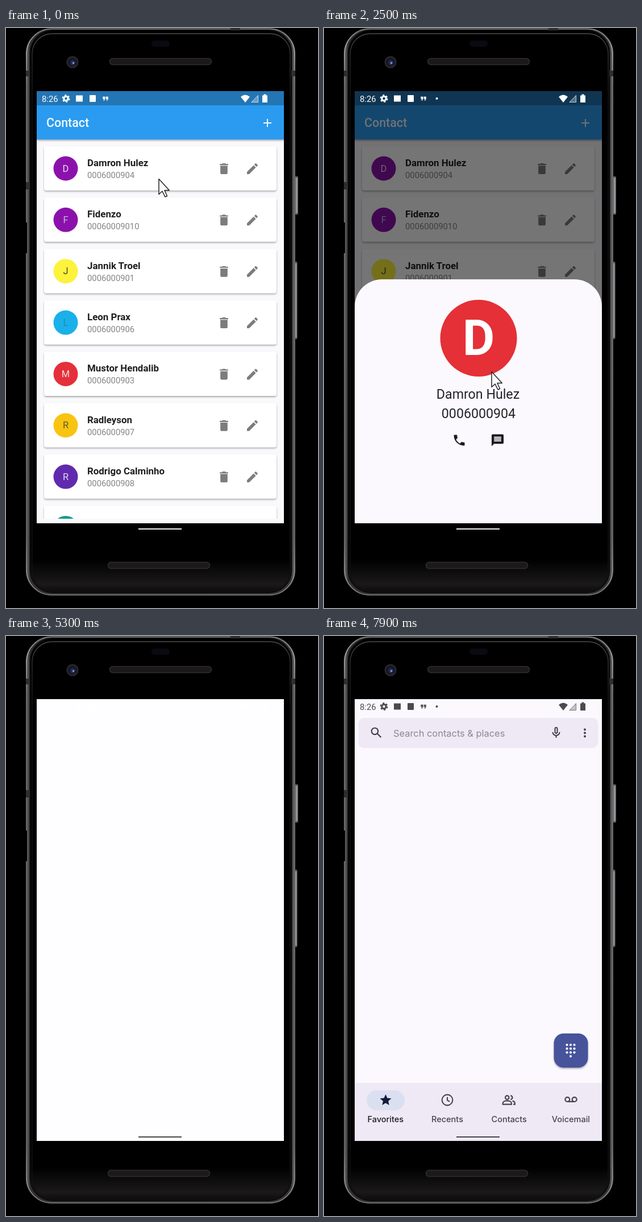
These frames come from a looping animation (549 px wide and 1020 px high, 8000 ms). An HTML page:

```html
<!DOCTYPE html>
<html lang="en">
<head>
<meta charset="utf-8">
<title>Contact app</title>
<style>
html, body { margin: 0; width: 100%; height: 100%; overflow: hidden; background: #000; }
svg { display: block; width: 549px; height: 1020px; }
text { font-family: Roboto, sans-serif; }
.round, .round text { font-family: Inter, sans-serif; }
.mid { text-anchor: middle; }
.line { fill: none; stroke-width: 2; }

.app, .dialer, .scrim, .sheet, .keys, .strip, .menu, .home, .search, .fab,
.status, .note, .dot, .bar, .paper, .cursor {
  animation: 8s linear infinite;
}
.app { animation-name: leave; }
.dialer { animation-name: enter; }
.scrim { animation-name: dim; }
.sheet { animation-name: rise; }
.keys { animation-name: keysMove, keysFade; }
.strip { animation-name: keysFade; }
.menu { animation-name: menu; }
.home { animation-name: home; }
.search { animation-name: search; }
.fab { animation-name: pop; transform-origin: 434px 729px; }
.status { animation-name: ink; }
.note { animation-name: note; transform-origin: 175px 124px; }
.dot { animation-name: dot; }
.bar { animation-name: bar; }
.paper { animation-name: paper; }
.cursor { animation-name: point, show; }

@keyframes leave {
  0%, 49.5% { transform: none; animation-timing-function: cubic-bezier(.3, 0, .8, .15); }
  50.75% { transform: translateX(-182px); animation-timing-function: cubic-bezier(.05, .7, .1, 1); }
  57%, 100% { transform: translateX(-456px); }
}
@keyframes enter {
  0%, 49.5% { transform: translateX(456px); animation-timing-function: cubic-bezier(.3, 0, .8, .15); }
  50.75% { transform: translateX(274px); animation-timing-function: cubic-bezier(.05, .7, .1, 1); }
  57%, 100% { transform: none; }
}
@keyframes dim {
  0%, 23.75% { opacity: 0; }
  26.9%, 100% { opacity: .54; }
}
@keyframes rise {
  0%, 23.75% { transform: translateY(430px); animation-timing-function: cubic-bezier(0, 0, .2, 1); }
  27%, 100% { transform: none; }
}
@keyframes keysMove {
  0%, 75% { transform: translateY(240px); animation-timing-function: cubic-bezier(0, 0, .2, 1); }
  80.6% { transform: none; }
  91.9% { transform: none; animation-timing-function: cubic-bezier(.4, 0, 1, 1); }
  95%, 100% { transform: translateY(440px); }
}
@keyframes keysFade {
  0%, 75% { opacity: 0; }
  78.1%, 100% { opacity: 1; }
}
@keyframes menu {
  0%, 81.2% { opacity: 0; }
  83.5%, 91.8% { opacity: 1; }
  91.9%, 100% { opacity: 0; }
}
@keyframes home {
  0%, 91.8% { opacity: 0; }
  91.9%, 100% { opacity: 1; }
}
@keyframes search {
  0%, 93.75% { opacity: 0; transform: translateY(-8px); }
  97%, 100% { opacity: 1; transform: none; }
}
@keyframes pop {
  0%, 94.4% { transform: scale(0); animation-timing-function: ease-out; }
  97.5%, 100% { transform: none; }
}
@keyframes ink {
  0%, 73.74% { color: #fff; }
  73.75%, 100% { color: #4b4a4f; }
}
@keyframes note {
  0%, 13.5% { transform: none; opacity: 1; }
  15% { transform: scale(.85); opacity: .75; }
  17.5%, 100% { transform: none; opacity: 1; }
}
@keyframes dot {
  0%, 13.5% { transform: translateX(-3px); opacity: 0; }
  15% { transform: translateX(-2px); opacity: 1; }
  17.5%, 100% { transform: none; opacity: 1; }
}
@keyframes bar {
  0%, 56% { fill: #f0f0f3; }
  64%, 100% { fill: #48474c; }
}
@keyframes paper {
  0%, 73.74% { fill: #fefdff; }
  73.75%, 100% { fill: #fcf9fe; }
}
@keyframes point {
  0%, 3% { transform: translate(268px, 265px); animation-timing-function: ease-in-out; }
  11.25% { transform: translate(462px, 164px); }
  12.5% { transform: translate(476px, 174px); }
  15% { transform: translate(443px, 184px); animation-timing-function: ease-in-out; }
  22.5% { transform: translate(300px, 258px); }
  24.5% { transform: translate(292px, 265px); animation-timing-function: ease-in-out; }
  31.25%, 36.25% { transform: translate(294px, 604px); animation-timing-function: ease-in-out; }
  43.75%, 57.5% { transform: translate(234px, 739px); animation-timing-function: ease-in; }
  63.1%, 100% { transform: translate(512px, 521px); }
}
@keyframes show {
  0%, 63.1% { opacity: 1; }
  63.2%, 100% { opacity: 0; }
}
</style>
</head>
<body>
<svg id="stage" viewBox="0 0 549 1020"></svg>
<script>
const PATHS = {
  trash: 'M6 19c0 1.1.9 2 2 2h8c1.1 0 2-.9 2-2V7H6v12zM19 4h-3.5l-1-1h-5l-1 1H5v2h14V4z',
  pencil: 'M3 17.25V21h3.75L17.81 9.94l-3.75-3.75L3 17.25zM20.71 7.04c.39-.39.39-1.02 0-1.41l-2.34-2.34c-.39-.39-1.02-.39-1.41 0l-1.83 1.83 3.75 3.75 1.83-1.83z',
  phone: 'M6.62 10.79c1.44 2.83 3.76 5.14 6.59 6.59l2.2-2.2c.27-.27.67-.36 1.02-.24 1.12.37 2.33.57 3.57.57.55 0 1 .45 1 1V20c0 .55-.45 1-1 1-9.39 0-17-7.61-17-17 0-.55.45-1 1-1h3.5c.55 0 1 .45 1 1 0 1.25.2 2.45.57 3.57.11.35.03.74-.25 1.02l-2.2 2.2z',
  chat: 'M20 2H4c-1.1 0-2 .9-2 2v18l4-4h14c1.1 0 2-.9 2-2V4c0-1.1-.9-2-2-2zm-2 12H6v-2h12v2zm0-3H6V9h12v2zm0-3H6V6h12v2z',
  star: 'M12 17.3l6.2 3.7-1.6-7L22 9.2l-7.2-.6L12 2 9.2 8.6 2 9.2 7.5 14l-1.7 7z',
  quote: 'M6 17h3l2-4V7H5v6h3zm8 0h3l2-4V7h-6v6h3z'
};
const LINES = {
  phone: 'M4 4h4l1.2 4.5-2.5 2.2a15 15 0 0 0 6.6 6.6l2.2-2.5L20 16v4C11 20 4 13 4 4z',
  chat: 'M3 21V3h18v14H7zM6 7h12M6 10h12M6 13h12',
  addPerson: 'M5.5 8a3.5 3.5 0 1 0 7 0a3.5 3.5 0 1 0-7 0M2 19v-2c0-5 14-5 14 0v2zM20 6v8M16 10h8',
  people: 'M6 8a3 3 0 1 0 6 0a3 3 0 1 0-6 0M2 19v-2c0-5 14-5 14 0v2zM14.5 5a3 3 0 0 1 0 6M17.5 13.5q4 1 4 3.5V19H19',
  search: 'M4 9.5a5.5 5.5 0 1 0 11 0a5.5 5.5 0 1 0-11 0M14 14l6 6',
  mic: 'M10 5a2 2 0 0 1 4 0v6a2 2 0 0 1-4 0zM6 11a6 6 0 0 0 12 0M12 17v4',
  clock: 'M3 12a9 9 0 1 0 18 0a9 9 0 1 0-18 0M12 7v5.5l4 2.3',
  tape: 'M3 12a3.5 3.5 0 1 0 7 0a3.5 3.5 0 1 0-7 0M14 12a3.5 3.5 0 1 0 7 0a3.5 3.5 0 1 0-7 0M6.5 15.5h11',
  erase: 'M8 5h14v14H8L2.5 12zM11.5 8.5l7 7M18.5 8.5l-7 7'
};

const rect = (x, y, w, h, fill, more = '') =>
  `<rect x="${x}" y="${y}" width="${w}" height="${h}" fill="${fill}" ${more}/>`;
const circle = (x, y, r, fill, more = '') =>
  `<circle cx="${x}" cy="${y}" r="${r}" fill="${fill}" ${more}/>`;
const text = (s, x, y, size, fill, more = '') =>
  `<text x="${x}" y="${y}" font-size="${size}" fill="${fill}" ${more}>${s}</text>`;
const place = (x, y, size) =>
  `transform="translate(${x - size / 2} ${y - size / 2}) scale(${size / 24})"`;
const icon = (name, x, y, fill, size = 25.3) =>
  `<path d="${PATHS[name]}" fill="${fill}" ${place(x, y, size)}/>`;
const line = (name, x, y, color, size = 25) =>
  `<path class="line" d="${LINES[name]}" stroke="${color}" ${place(x, y, size)}/>`;
const group = (cls, ...parts) => `<g class="${cls}">${parts.join('')}</g>`;
const dots = (x, y, fill) => [-6, 0, 6].map(d => circle(x, y + d, 1.9, fill)).join('');
const MID = 'class="mid"';

const people = [
  ['Damron Hulez', '0006000904', '#8c11ac', '#eadcf2'],
  ['Fidenzo', '00060009010', '#8c11ac', '#c9b4e0'],
  ['Jannik Troel', '0006000901', '#fdf23c', '#4c4a28'],
  ['Leon Prax', '0006000906', '#1ab0ea', '#2a82b8'],
  ['Mustor Hendalib', '0006000903', '#e4303a', '#f8dcdc'],
  ['Radleyson', '0006000907', '#f8c411', '#63572c'],
  ['Rodrigo Calminho', '0006000908', '#612aae', '#e2d8f2'],
  ['Sudli Mord', '0006000909', '#159b8b', '#fff']
];

const row = ([name, number, color, ink], i) => {
  const y = 208 + i * 90.35;
  return rect(67, y, 409, 77.5, '#fff', 'rx="4" filter="url(#lift)"') +
    circle(105, y + 39, 21.5, color) +
    text(name[0], 105, y + 44.5, 16.5, ink, MID) +
    text(name, 143, y + 35, 16.9, '#1f1f21', 'font-weight="700"') +
    text(number, 143, y + 56, 14.8, '#858585') +
    icon('trash', 383.5, y + 39.5, '#7c7c7c') +
    icon('pencil', 433.5, y + 39.5, '#7c7c7c');
};

const app = group('app',
  rect(54, 111, 435, 760, '#f9f8fb'),
  `<g clip-path="url(#list)">${people.map(row).join('')}</g>`,
  rect(54, 136, 435, 60, '#2b9bf0', 'filter="url(#lift)"'),
  rect(54, 111, 435, 25, '#2475b4'),
  text('Contact', 71, 174, 21.4, '#f4faff', 'font-weight="500"'),
  '<path class="line" d="M453 167h14M460 160v14" stroke="#f4faff"/>',
  rect(54, 111, 435, 760, '#000', 'class="scrim"'),
  group('sheet',
    '<path d="M54 871V490a48 48 0 0 1 48-48H441a48 48 0 0 1 48 48V871z" fill="#fbf9fd"/>',
    circle(272, 545.5, 67.5, '#e43036'),
    text('D', 272, 575, 87, '#fff', 'class="mid" font-weight="700"'),
    text(people[0][0], 271, 652, 23.2, '#232326', MID),
    text(people[0][1], 272, 685.5, 23.2, '#232326', MID),
    icon('phone', 238, 725, '#1d1b20'),
    icon('chat', 305.5, 725, '#1d1b20')),
  rect(54, 871, 435, 17, '#000'),
  rect(233, 880, 76, 2, '#f2f2f2'));

const letters = ['', 'ABC', 'DEF', 'GHI', 'JKL', 'MNO', 'PQRS', 'TUV', 'WXYZ', '', '+', ''];
const key = (s, i) => {
  const x = 132.5 + i % 3 * 138.7, y = 547 + Math.floor(i / 3) * 68;
  const sign = i === 9 || i === 11;
  return (sign
    ? text(s, x, y + (i === 9 ? 21 : 12), i === 9 ? 33 : 24, '#4a484f', 'class="mid" font-weight="500"')
    : text(s, x, y + 13.5, 38, '#46539a', MID)) +
    text(letters[i], x, y + 30, i === 10 ? 9 : 11.5, '#56545c', MID);
};

const keypad = `<g clip-path="url(#pad)">` + group('keys',
  rect(54, 451, 435, 437, '#eee9f5', 'filter="url(#glow)"'),
  rect(54, 514, 435, 1, '#e9e5f0'),
  dots(84, 485, '#3f3d44'),
  text(people[0][1], 271.5, 500, 38, '#1f1d23', MID),
  line('erase', 459.5, 485, '#4a484f', 24),
  [...'123456789*0#'].map(key).join(''),
  line('tape', 132.5, 572, '#3f3d44', 19),
  rect(220, 798, 104, 60, '#2a9a42', 'rx="30"'),
  line('phone', 250, 828, '#fff', 24),
  text('Call', 275, 835, 15, '#fff')) + '</g>';

const option = (mark, label, y) =>
  line(mark, 96.5, y, '#46539a') + text(label, 139, y + 6.5, 16.1, '#46539a');

const tab = (label, i) =>
  text(label, 108.3 + i * 108.7, 854.5, 14.5, i ? '#46444c' : '#1d1b20', 'class="mid" font-weight="500"');

const pips = [...Array(10).keys()].map(i =>
  circle(434 + (i < 9 ? i % 3 - 1 : 0) * 6.5, 719 + Math.floor(i / 3) * 6.7, 2.1, '#fff')).join('');

const home = group('home',
  group('search',
    rect(60.5, 144, 422, 53, '#eee9f4', 'rx="10"'),
    line('search', 92, 170, '#3f3d44'),
    text('Search contacts &amp; places', 122, 177, 16.4, '#8b8892'),
    line('mic', 408.5, 170, '#3f3d44', 24),
    dots(459, 170.5, '#3f3d44')),
  rect(54, 786, 435, 102, '#eee9f5'),
  rect(75, 799, 67, 35, '#dbe0f1', 'rx="17.5"'),
  icon('star', 108.5, 816, '#141a38', 24),
  line('clock', 217, 816, '#46444c'),
  line('people', 325.5, 816, '#46444c', 26),
  line('tape', 434.5, 815, '#46444c', 27),
  ['Favorites', 'Recents', 'Contacts', 'Voicemail'].map(tab).join(''),
  group('fab', rect(404.5, 699, 60, 60, '#46539a', 'rx="17" filter="url(#lift)"'), pips));

const dialer = group('dialer round',
  rect(54, 111, 435, 777, '#fefdff', 'class="paper"'),
  group('menu',
    option('addPerson', 'Create new contact', 162),
    option('addPerson', 'Add to a contact', 213),
    option('chat', 'Send a message', 264)),
  home,
  rect(54, 871, 435, 17, '#eee9f5', 'class="strip"'),
  keypad,
  rect(233, 880, 76, 2, '#48474c', 'class="bar"'));

const ink = 'currentColor';
const status = group('status',
  text('8:26', 63, 129.5, 14.8, ink),
  `<circle class="line" cx="105.5" cy="124" r="3.7" stroke="${ink}" style="stroke-width:3"/>`,
  `<circle class="line" cx="105.5" cy="124" r="6" stroke="${ink}" stroke-dasharray="3.14"/>`,
  rect(123, 118.5, 12, 11, ink),
  rect(147, 118, 11, 12, ink, 'rx="1"'),
  group('note', icon('quote', 175, 124, ink, 16)),
  circle(198.5, 124, 2, ink, 'class="dot"'),
  `<path d="M421 131l-8-10q8-7 16 0z" fill="${ink}"/>`,
  `<path d="M432 130.5h11.5v-12z" fill="${ink}" fill-opacity=".3" stroke="${ink}" stroke-opacity=".7"/>`,
  `<path d="M451 118.5h2.5v-2h4v2h2.5v12.5h-9z" fill="${ink}"/>`);

const speaker = (x, y) =>
  rect(x, y, 179, 11, '#1b191a', 'rx="5.5" stroke="#302d2e" stroke-width="1.5"');

const phone = group('phone',
  rect(508, 261, 6, 67, '#6a6a6c', 'rx="2"'),
  rect(510, 264, 2.5, 61, '#9a9a9c'),
  rect(507, 411, 5.5, 136, '#626264', 'rx="2"'),
  rect(509, 414, 2.5, 130, '#949496'),
  rect(36, 1.5, 472, 995.5, 'url(#rim)', 'rx="44" stroke="url(#edge)" stroke-width="2"'),
  rect(42.5, 4, 460, 989, 'url(#face)', 'rx="40" stroke="#0c0c0d" stroke-width="2"'),
  rect(46, 10, 454, 980, 'none', 'rx="35" stroke="url(#shine)" stroke-width="1.5"'),
  rect(34, 342, 3, 54, '#000'),
  [[35, 75, 7, 10], [35, 271, 7, 13], [502, 75, 7, 10], [395, 0, 17, 4]]
    .map(([x, y, w, h]) => rect(x, y, w, h, '#2e2e2f')).join(''),
  rect(256, 22, 32, 11, '#0b0a10', 'rx="5"'),
  speaker(182.5, 53.5),
  speaker(179.5, 939.5),
  circle(117, 60, 9.5, '#171820', 'stroke="#2e2c31" stroke-width="2"'),
  circle(117.5, 61, 4.5, '#202b58'),
  circle(118.5, 61.5, 1.7, '#7fa0e6'));

document.getElementById('stage').innerHTML = `
  <defs>
    <clipPath id="screen"><rect x="54" y="111" width="435" height="777"/></clipPath>
    <clipPath id="list"><rect x="54" y="196" width="435" height="667"/></clipPath>
    <clipPath id="pad"><rect x="54" y="111" width="435" height="760"/></clipPath>
    <filter id="lift" x="-10%" y="-10%" width="120%" height="140%">
      <feDropShadow dx="0" dy="2" stdDeviation="1.6" flood-opacity=".32"/>
    </filter>
    <filter id="glow"><feDropShadow dx="0" dy="-2" stdDeviation="2" flood-opacity=".1"/></filter>
    <linearGradient id="rim">
      <stop stop-color="#69696b"/><stop offset=".014" stop-color="#2f2f30"/>
      <stop offset=".986" stop-color="#363637"/><stop offset="1" stop-color="#6c6c6e"/>
    </linearGradient>
    <linearGradient id="edge" x2="0" y2="1">
      <stop stop-color="#777779"/><stop offset=".03" stop-color="#a0a0a2"/>
      <stop offset=".1" stop-color="#6a6a6c"/><stop offset=".9" stop-color="#626264"/>
      <stop offset=".97" stop-color="#8c8c8e"/><stop offset="1" stop-color="#707072"/>
    </linearGradient>
    <linearGradient id="shine" x2="0" y2="1">
      <stop stop-color="#4a4a4c"/><stop offset=".04" stop-color="#2c2c2e"/><stop offset=".12" stop-color="#111112"/>
    </linearGradient>
    <linearGradient id="face" x2="0" y2="1">
      <stop offset=".94"/><stop offset=".985" stop-color="#1b1919"/><stop offset="1" stop-color="#0b0b0b"/>
    </linearGradient>
  </defs>
  ${phone}
  <g clip-path="url(#screen)">${rect(54, 111, 435, 777, '#d8d7e5')}${app}${dialer}${status}</g>
  <path class="cursor" d="M1 .5V27.5L7 22L12 32L15.500 30.500L11 20.500H19.300Z"
    fill="#fff" stroke="#222" stroke-width="1.5" stroke-linejoin="round"/>`;
</script>
</body>
</html>
```
